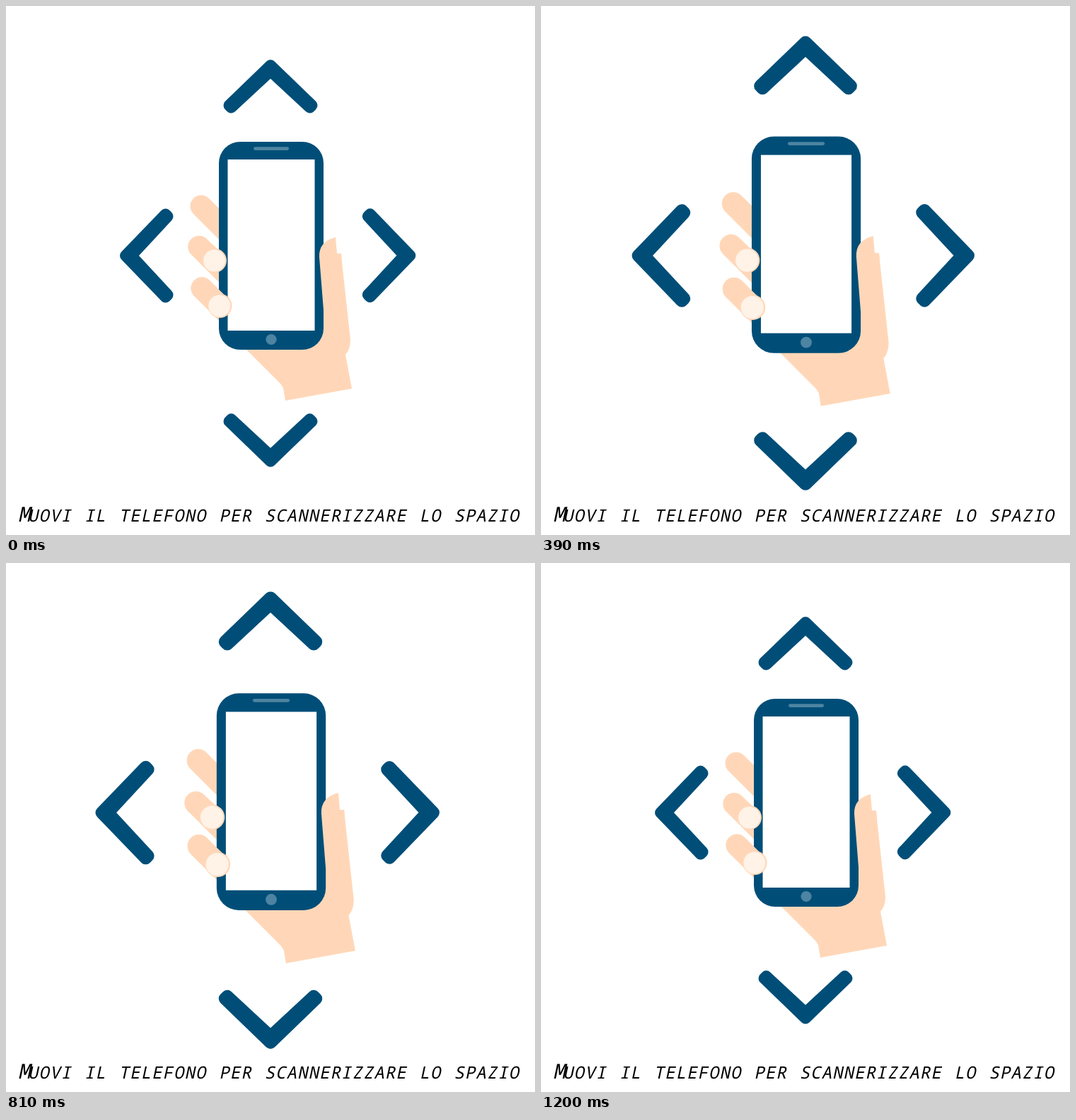
An HTML page that plays this animation: 748 by 748 pixels, repeating every 1.23 s.

```html
<!DOCTYPE html>
<html lang="it">
<head>
<meta charset="utf-8">
<style>
  html, body { margin: 0; height: 100%; overflow: hidden; background: #fff; }
  svg { display: block; width: 100vw; height: 100vh; }
  .blue { fill: #004e78; }
  .skin { fill: #ffd7b8; }
  .finger { stroke: #ffd7b8; stroke-width: 31; stroke-linecap: round; }
  .nail { fill: #fff2e7; }
  .detail { fill: #4d84a1; }
  #chevron { stroke: #004e78; stroke-width: 16; stroke-linejoin: round; }
  text { font: 24px "Noto Sans Mono", "DejaVu Sans Mono", monospace; letter-spacing: 1.1px; word-spacing: 2.3px; }
  .initial { font-size: 29px; letter-spacing: -3.4px; }
</style>
</head>
<body>
<svg viewBox="0 0 748 748">
  <defs>
    <path id="chevron" class="blue" d="M-58.5 26.5L0 -30L58.5 26.5L55.5 29.5L0 -22L-55.5 29.5Z"/>
  </defs>
  <g id="phone">
    <path class="finger" d="M276 283L320 327M273 340.5L310 377.5M277 399L312 434"/>
    <path class="skin" d="M445 350H474L475 362L487 472Q487 485 480 493L489 541L395 558L392 540L388 534L335 481L440 470Z"/>
    <rect class="blue" x="301" y="192" width="148" height="294" rx="30"/>
    <rect x="313.5" y="217" width="123" height="242" fill="#fff"/>
    <rect class="detail" x="350" y="199.3" width="50" height="4.6" rx="2.3"/>
    <circle class="detail" cx="375" cy="471.5" r="7.6"/>
    <path class="skin" d="M466 327Q442 333 443 355L449 430L460 440L475 362L474 354L468 350Z"/>
    <path class="finger" d="M273 340.5L294 360M277 399L302 423.5"/>
    <circle class="skin" cx="295" cy="360" r="17"/>
    <circle class="nail" cx="294.5" cy="360" r="15.5"/>
    <circle class="skin" cx="302.5" cy="424" r="17"/>
    <circle class="nail" cx="301.8" cy="424" r="15.5"/>
  </g>
  <use href="#chevron" id="up"/>
  <use href="#chevron" id="right"/>
  <use href="#chevron" id="down"/>
  <use href="#chevron" id="left"/>
  <text transform="translate(17 729) skewX(-12)"><tspan class="initial">M</tspan>UOVI IL TELEFONO PER SCANNERIZZARE LO SPAZIO</text>
</svg>
<script>
  const LOOP = 1230, STEP = 30, HALF = 600;

  // Cubic Bézier easing with control points (x1, 0) and (x2, 1)
  const bezier = (x1, x2) => t => {
    let lo = 0, hi = 1, s;
    for (let i = 0; i < 24; i++) {
      s = (lo + hi) / 2;
      const x = 3 * s * (1 - s) ** 2 * x1 + 3 * s * s * (1 - s) * x2 + s ** 3;
      if (x < t) lo = s; else hi = s;
    }
    return s * s * (3 - 2 * s);
  };
  const easeInOut = bezier(.65, .35);
  const easeSoft = bezier(.65, .5);
  const easeLate = bezier(.68, .65);

  const growth = (t, easeBack) => t < HALF
    ? easeInOut(t / HALF)
    : 1 - easeBack(Math.min((t - HALF) / HALF, 1));

  const arrows = [
    { id: "up", x: 374, y: 114, dx: 0, dy: -36, angle: 0, back: easeLate },
    { id: "right", x: 541.3, y: 352.8, dx: 36.2, dy: 0, angle: 90, back: easeInOut },
    { id: "down", x: 374, y: 613.8, dx: 0, dy: 35.5, angle: 180, back: easeLate },
    { id: "left", x: 199, y: 353, dx: -34.8, dy: 0, angle: -90, back: easeLate }
  ];

  const place = (id, value) => document.getElementById(id).setAttribute("transform", value);

  function draw(t) {
    const scale = 1 + .05 * growth(t, easeSoft);
    place("phone", `translate(375 371) scale(${scale}) translate(-375 -371)`);
    for (const a of arrows) {
      const p = growth(t, a.back);
      place(a.id, `translate(${a.x + a.dx * p} ${a.y + a.dy * p}) rotate(${a.angle}) scale(${1 + .115 * p})`);
    }
  }

  const start = performance.now();
  function tick() {
    const t = (performance.now() - start) % LOOP;
    draw(Math.floor(t / STEP) * STEP);
    requestAnimationFrame(tick);
  }
  draw(0);
  requestAnimationFrame(tick);
</script>
</body>
</html>
```
